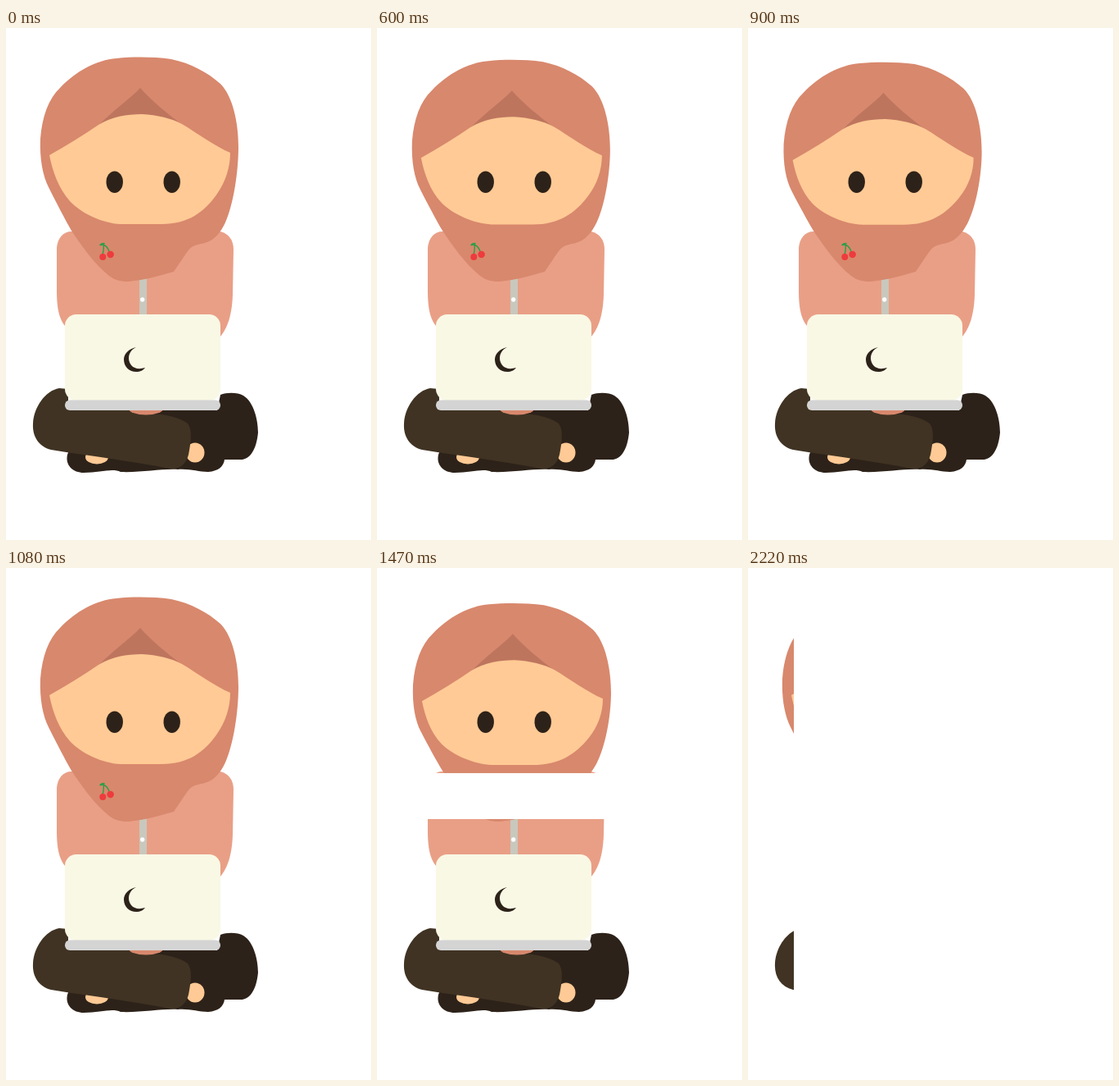
An HTML page with a canvas that plays this animation: 446 by 624 pixels, repeating every 2250 ms.

```html
<!DOCTYPE html>
<html lang="en">
<head>
<meta charset="utf-8">
<style>
html, body { margin: 0; width: 446px; height: 624px; overflow: hidden; background: #fff; }
canvas { display: block; }
</style>
</head>
<body>
<canvas id="stage" width="446" height="624"></canvas>
<script>
const W = 446, H = 624, LOOP = 2250, STEP = 30;
const MOVE_START = 480, MOVE_END = 1650, WIPE = 2220, NOD_STEPS = 20;
const ctx = document.getElementById('stage').getContext('2d');
const color = {
  scarf: '#d8886d', fold: '#be755e', skin: '#ffca95', shirt: '#e99f86',
  dark: '#2d2219', leg: '#403323', lid: '#f9f8e5', base: '#d4d4d4',
  zip: '#c9c8bd', red: '#ee3b3d', green: '#2f9e48'
};

const shape = {
  shirt: 'M62,268 C63,256 70,248 80,248 L262,248 C272,251 278,258 278,270 L277,325 C276,352 270,366 262,376 L75,366 C66,358 62,345 62,320Z',
  rightLeg: 'M165,466 L258,466 L262,447 C270,444 283,444 290,448 C303,456 308,478 308,493 C306,514 298,527 285,526 L267,526 C266,534 260,540 247,541 C235,541 225,537 210,538 C190,537 165,542 140,541 C130,536 115,542 95,542 C82,542 72,533 75,520 L78,512Z',
  leftLeg: 'M33,482 C34,462 48,442 65,439 L76,440 L76,464 L150,464 C160,472 180,470 190,471 C202,473 214,476 222,482 C228,490 226,505 223,520 C220,532 212,538 200,537 C170,531 130,525 80,518 L55,514 C40,510 32,498 33,482Z',
  moon: 'M159,389 C150,391 144,397 144,404 C144,413 151,419 159,419 C164,419 168,417 170,414 C157,418 150,411 150,402 C150,397 153,392 159,389Z',
  scarf: 'M42,135 C44,108 52,86 66,73 C85,53 110,39 135,37 C155,35 180,35 202,38 C226,43 246,54 262,68 C277,83 284,115 284,145 C284,175 278,215 268,237 C262,250 254,259 243,262 C235,264 228,264 222,272 C215,282 211,288 205,297 C187,302 170,307 150,309 C140,309 134,308 126,302 C108,288 92,265 80,247 C72,233 62,214 52,194 C45,180 41,160 42,135Z',
  fold: 'M164,73 C152,86 131,100 113,119 L214,117 C197,104 178,89 164,73Z',
  face: 'M53,155 C75,143 95,130 113,118 C130,108 147,105 166,105 C185,106 202,110 215,117 C235,129 255,144 274,152 C274,170 268,188 258,202 C242,225 222,239 190,239 L140,239 C118,238 92,226 78,211 C64,195 57,175 53,155Z'
};

function fill(d, style) {
  ctx.fillStyle = style;
  ctx.fill(new Path2D(d));
}

function ellipse(x, y, rx, ry, style) {
  ctx.fillStyle = style;
  ctx.beginPath();
  ctx.ellipse(x, y, rx, ry, 0, 0, 2 * Math.PI);
  ctx.fill();
}

function roundRect(x, y, w, h, r, style) {
  ctx.fillStyle = style;
  ctx.beginPath();
  ctx.roundRect(x, y, w, h, r);
  ctx.fill();
}

// The nod moves the top of the head fully and fades out towards the chin.
function nodded(d, nod) {
  return d.replace(/(\d+),(\d+)/g, (_, x, y) => {
    const pull = nod * Math.min(1, Math.max(0, (250 - y) / 80));
    return `${+x + 2.5 * pull},${+y + 9.2 * pull}`;
  });
}

function drawCherries() {
  ctx.strokeStyle = color.green;
  ctx.lineWidth = 1.5;
  ctx.stroke(new Path2D('M118,276 Q120,269 119,264 Q125,267 126,273'));
  fill('M114,265 Q116,261 121,262 Q119,266 114,265Z', color.green);
  ellipse(118.3, 279, 4, 4, color.red);
  ellipse(127.6, 276, 4.3, 4.2, color.red);
}

function drawPerson(nod) {
  fill(shape.shirt, color.shirt);
  roundRect(163, 300, 9, 52, 0, color.zip);
  ellipse(166.7, 331, 2.6, 2.8, '#fff');

  fill(nodded(shape.scarf, nod), color.scarf);
  fill(nodded(shape.fold, nod), color.fold);
  fill(nodded(shape.face, nod), color.skin);
  for (const x of [132.7, 202.7]) ellipse(x, 187.7, 10.2, 13.2, color.dark);
  drawCherries();

  fill(shape.rightLeg, color.dark);
  ellipse(111, 523, 14, 8.5, color.skin);
  ellipse(231, 517.5, 11.5, 12, color.skin);
  fill(shape.leftLeg, color.leg);
  ellipse(171, 464, 21, 7.5, color.scarf);

  roundRect(72, 349, 190, 105, 14, color.lid);
  roundRect(72, 453.5, 190, 12.5, 6, color.base);
  fill(shape.moon, color.dark);
}

// While nodding, only a band of the head is painted above the still part.
function visibleRects(step) {
  const k = step % NOD_STEPS;
  let band = [42, 35, 244, 215];
  if (k >= 7 && k <= 12) band = k % 2 ? [55, 138, 231, 112] : [43, 44, 236, 124];
  const stillTop = step > NOD_STEPS ? 306 : 250;
  return [band, [0, stillTop, W, H - stillTop]];
}

function render(time) {
  const t = time % LOOP;
  const step = Math.floor((t - MOVE_START) / STEP);
  const moving = t >= MOVE_START && t < MOVE_END;
  let rects = [[0, 0, W, H]], nod = 0;
  if (t >= WIPE) rects = [[0, 0, 56, H]];
  else if (moving && step % NOD_STEPS) {
    rects = visibleRects(step);
    nod = Math.sin(Math.PI * step / NOD_STEPS) ** 2;
  }

  ctx.fillStyle = '#fff';
  ctx.fillRect(0, 0, W, H);
  ctx.save();
  ctx.beginPath();
  rects.forEach(r => ctx.rect(...r));
  ctx.clip();
  drawPerson(nod);
  ctx.restore();
}

const start = performance.now();
function tick() {
  render(performance.now() - start);
  requestAnimationFrame(tick);
}
tick();
</script>
</body>
</html>
```
